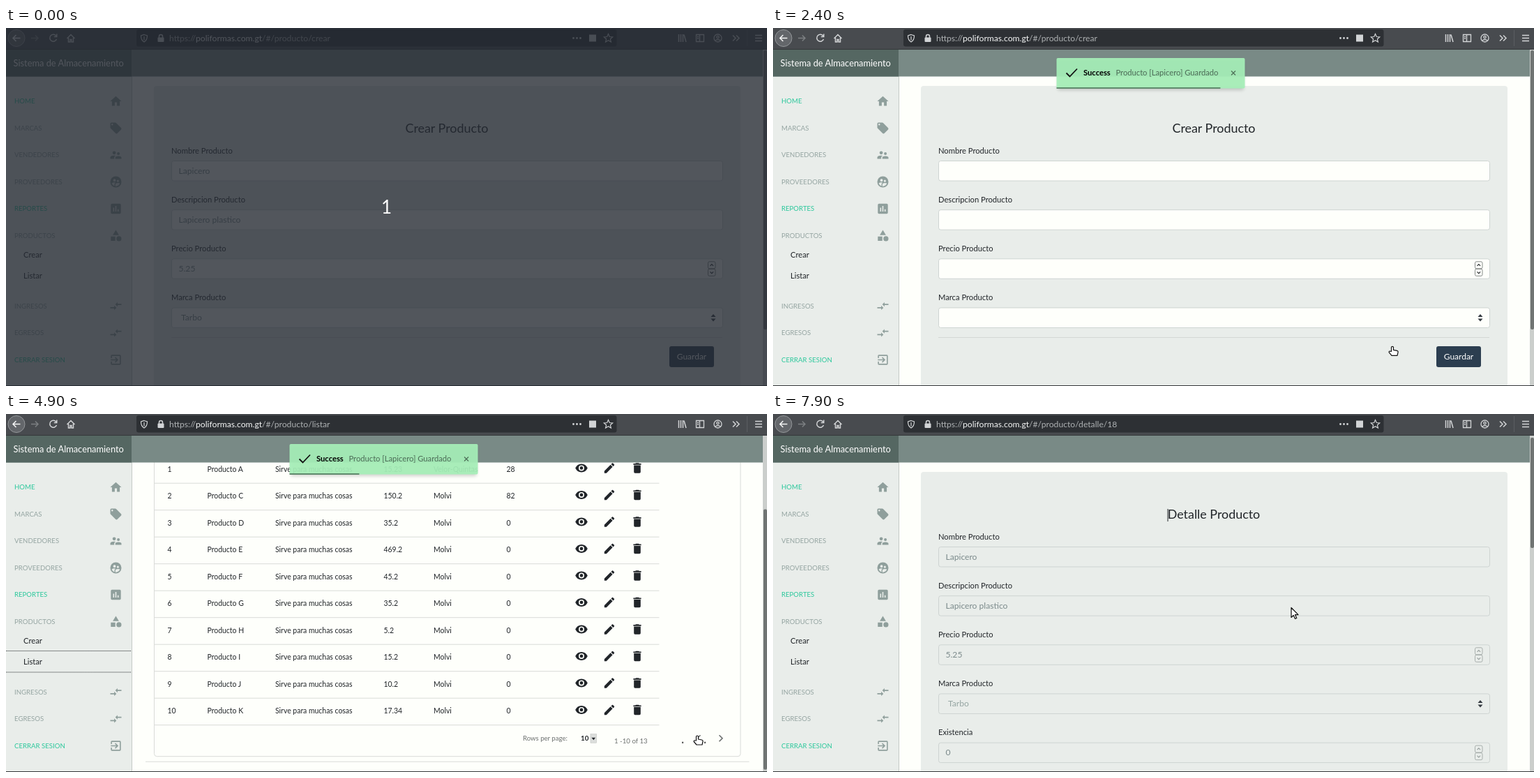
Animation of 1091x513 px, one loop 8000 ms. Source, as an HTML page:

```html
<!DOCTYPE html>
<html lang="es">
<head>
<meta charset="utf-8">
<title>Sistema de Almacenamiento</title>
<style>
html, body { margin: 0; width: 100%; height: 100%; overflow: hidden; background: #fefffb; }
svg { display: block; width: 1091px; height: 513px; font-family: Lato, sans-serif; }
</style>
</head>
<body>
<svg id="stage" viewBox="0 0 1091 513"></svg>
<script>
const stage = document.getElementById('stage');
const LOOP = 8000, STEP = 100, ROW = 38.5, TOP = 179.2;
const PAGE = '#fefffb', PANEL = '#e9edea', INK = '#212529', MUTED = '#95a5a2', GREEN = '#2cc89c',
  FIELD = '#7b8a8b', EDGE = '#ced4d2', RULE = '#d9dbd8', CHROME = '#d2d4d6';

// Drawing helpers; text takes the middle of its capitals as y
const text = (s, x, y, size, fill = INK, more = '') =>
  `<text x="${x}" y="${y + size * .36}" font-size="${size}" fill="${fill}" ${more}>${s}</text>`;
const rect = (x, y, w, h, fill, more = '') =>
  `<rect x="${x}" y="${y}" width="${w}" height="${h}" fill="${fill}" ${more}/>`;
const line = (d, color, w = 1, more = '') =>
  `<path d="${d}" fill="none" stroke="${color}" stroke-width="${w}" ${more}/>`;
const ring = (x, y, r) => `M${x - r} ${y}a${r} ${r} 0 1 0 ${2 * r} 0a${r} ${r} 0 1 0 ${-2 * r} 0z`;
const group = (x, y, s, more = '') => `<g transform="translate(${x} ${y})" ${more}>${s}</g>`;
const clamp = v => Math.max(0, Math.min(1, v));

// 24-unit icons
const icons = {
  home: 'M10 20v-6h4v6h5v-8h3L12 3 2 12h3v8z',
  tag: 'M4 2h7q.9 0 1.5.6l9 9q1 1.4 0 2.8l-7 7q-1.4 1-2.8 0l-9-9Q2 11.800 2 11V4q0-2 2-2z' + ring(5.5, 5.5, 1.5),
  people: ring(9, 8, 3) + ring(16.5, 9.5, 2.5) +
    'M9 13q-7 .3-7 3.500V19h7v-2.250q0-2 2.400-3.500zM16.500 14q-5.500.4-5.500 2.750V19h11v-2.250q0-2.300-5.500-2.750z',
  circle: ring(12, 12, 10) + ring(9.6, 9.1, 2.4) + ring(15.6, 10.3, 1.9) +
    'M9.600 15.900v3.700q-3.800-1.300-5.100-5 2.500-2 7-1.400-1.900.9-1.900 2.700zM11.200 20v-4.100q.6-2 4.400-2.100 2.500.1 3.800 1.100-2.500 5.100-8.200 5.100z',
  chart: 'M5 3h14q2 0 2 2v14q0 2-2 2H5q-2 0-2-2V5q0-2 2-2zM7 10v7h2v-7zM11 7v10h2V7zM15 13v4h2v-4z',
  shapes: 'M12 2L6.500 11h11zM3 13.500h8v8H3z' + ring(17.5, 17.5, 4.5),
  swap: 'M9 14H2v2h7v3l4-4-4-4zM15 13v-3h7V8h-7V5l-4 4z',
  exit: 'M10.100 15.600L11.500 17l5-5-5-5-1.400 1.400L12.700 11H3v2h9.700zM19 3H5Q3 3 3 5v4h2V5h14v14H5v-4H3v4q0 2 2 2h14q2 0 2-2V5q0-2-2-2z',
  print: 'M19 8H5q-3 0-3 3v6h4v4h12v-4h4v-6q0-3-3-3zM8 14h8v5H8zM18 3H6v4h12z' + ring(19, 11, 1),
  doc: 'M14 2H6Q4 2 4 4v16q0 2 2 2h12q2 0 2-2V8zM8 16h8v2H8zM8 12h8v2H8zM13 3.500L18.500 9H13z',
  search: ring(9.5, 9.5, 6.5) + ring(9.5, 9.5, 4.5) + 'M14 15.500L15.500 14l5 5-1.500 1.500z',
  eye: 'M12 4.500Q4.300 4.800 1 12q3.300 7.200 11 7.500 7.700-.3 11-7.500-3.300-7.200-11-7.500z' + ring(12, 12, 5) + ring(12, 12, 3),
  pen: 'M3 17.250V21h3.750L17.800 9.900l-3.700-3.700zM20.700 7q.6-.7 0-1.400l-2.300-2.300q-.7-.6-1.400 0l-1.900 1.800 3.800 3.800z',
  bin: 'M6 19q0 2 2 2h8q2 0 2-2V7H6zM19 4h-3.500l-1-1h-5l-1 1H5v2h14z'
};
const icon = (name, x, y, fill = INK, size = 19.2) =>
  `<path transform="translate(${x - size / 2} ${y - size / 2}) scale(${size / 24})" d="${icons[name]}" fill="${fill}" fill-rule="evenodd"/>`;

const menu = [['HOME', 105, 'home', 1], ['MARCAS', 143.5, 'tag'], ['VENDEDORES', 182, 'people'],
  ['PROVEEDORES', 220.5, 'circle'], ['REPORTES', 259, 'chart', 1], ['PRODUCTOS', 297.5, 'shapes'],
  ['INGRESOS', 398.5, 'swap'], ['EGRESOS', 437, 'swap'], ['CERRAR SESION', 475.5, 'exit', 1]];
const heads = ['Id', 'Nombre', 'Descripcion', 'Precio', 'Marca', 'Existencia', 'Actions'];
const product = (id, letter, price, brand = 'Molvi', stock = 0) =>
  [id, 'Producto ' + letter, 'Sirve para muchas cosas', price, brand, stock];
const first = [product(1, 'A', 15.23, 'Velor-Quintas', 28), product(2, 'C', 150.2, 'Molvi', 82),
  ...[35.2, 469.2, 45.2, 35.2, 5.2, 15.2, 10.2, 17.34].map((p, i) => product(i + 3, 'DEFGHIJK'[i], p))];
const second = [product(11, 'L', 16.2), product(12, 'M', 25.2),
  [18, 'Lapicero', 'Lapicero plastico', 5.25, 'Tarbo', 0]];
const columns = {
  loading: [231.5, 284, 363.5, 458.5, 530, 601, 688],
  first: [231.5, 288.5, 386, 541.5, 613, 717.5, 805],
  second: [233, 290, 389, 544.5, 616, 687.5, 774.5]
};

// Interpolate [time, ...values] keys
function at(keys, t) {
  const n = keys.findIndex(k => k[0] > t);
  if (n < 0) return keys.at(-1).slice(1);
  if (!n) return keys[0].slice(1);
  const a = keys[n - 1], b = keys[n], u = (t - a[0]) / (b[0] - a[0]);
  return a.slice(1).map((v, i) => v + (b[i + 1] - v) * u);
}
const pointer = [[300, 423, 229], [400, 530, 290], [500, 720, 385], [600, 841, 434], [700, 841, 434],
  [800, 930, 439], [900, 984, 443], [1000, 984, 443], [1300, 982, 472], [2300, 982, 472],
  [2600, 700, 425], [3000, 110, 346], [3200, 73, 344.5], [3400, 73, 344.5], [3900, 650, 405],
  [4100, 686, 417], [4300, 700, 425], [4800, 991, 461], [4900, 991, 461], [5100, 1023, 461],
  [6000, 1023, 461], [6400, 694, 351], [6500, 694, 351], [6700, 793, 271], [7100, 793, 271],
  [7500, 743, 277.5]];
const scrolling = [[3800, 0], [4100, 70], [4200, 70], [4500, 118.5]];

function form(title, values, locked, hovered) {
  const names = ['Nombre Producto', 'Descripcion Producto', 'Precio Producto', 'Marca Producto'];
  if (locked) names.push('Existencia');
  let s = rect(212, 83, 841, 440, PANEL, 'rx="4"') +
    text(title, 632, 144, 17.9, INK, 'text-anchor="middle"');
  if (locked) s += line('M566 136v18', INK);
  names.forEach((name, i) => {
    const y = 190.5 + i * 70.15, mid = y + 14, tone = locked ? '#98a09e' : '#6a6f6e';
    s += text(name, 237, y - 15, 11.2) +
      rect(237.5, y, 790, 28.5, locked ? PANEL : PAGE, `stroke="${EDGE}" rx="3"`) +
      text(values[i] ?? '', i == 3 ? 251 : 247.5, mid, 12.1, locked && i == 3 ? MUTED : FIELD);
    if (i == 3) s += `<path d="M1010.500 ${mid - 1}l3.500-4 3.500 4zm0 2.500l3.500 4 3.500-4z" fill="#343a40"/>`;
    if (i == 2 || i == 4)
      s += [0, 1].map(k => rect(1006.5, mid - 10 + k * 10.5, 10.5, 10, 'none', `stroke="${tone}" stroke-width=".8" rx="2"`) +
        line(`M1009.500 ${mid - 4 + k * 8.500}l2.300 ${k ? 2.3 : -2.3}l2.300 ${k ? -2.3 : 2.3}`, locked ? tone : INK, 1.1)).join('');
  });
  if (!locked)
    s += line('M237 443.500H1027', '#d3d7d4') + rect(951, 456, 64, 30, hovered ? '#1a252f' : '#2c3e50', 'rx="3"') +
      text('Guardar', 983, 470.5, 12, '#fff', 'text-anchor="middle"');
  return s;
}

function listing(kind, mx, my) {
  const wide = kind == 'second', cols = columns[kind], rows = wide ? second : first;
  const left = wide ? 213.5 : 212, right = wide ? 1062.5 : 1053, dx = right - 1053;
  const n = kind == 'loading' ? 10 : rows.length, end = kind == 'loading' ? 643 : cols[6] + 131.5;
  const last = TOP + n * ROW, over = Math.floor((my + 3 - TOP) / ROW);
  let s = rect(left + .5, 83.5, right - left - .5, last + 45 - 83.5, PAGE, `stroke="${RULE}" rx="4"`) +
    line(`M${left} 134.500H${right}`, RULE) + text('Listado de Productos', cols[0], 108, 16.1) +
    line(`M${cols[0] + 1} 100v17`, INK) +
    icon('print', 961 + dx, 105.5, '#5f6362') + icon('doc', 993 + dx, 105.5, '#5f6362') +
    icon('search', 1025 + dx, 105.5, '#5f6362') +
    heads.map((h, i) => text(h, cols[i], 157, 9.6, '#676b6a')).join('');
  for (let i = 0; i < n; i++) {
    const y = TOP + (i + .5) * ROW;
    if (kind == 'loading') s += rect(232, y - 6, 400, 12, '#dcddda', 'rx="3"');
    else {
      if (i == over && mx > left && mx < end) s += rect(left + 1, y - ROW / 2, end - left - 1, ROW, '#ececea');
      s += rows[i].map((v, k) => text(v, cols[k], y - .8, 10.45)).join('') +
        ['eye', 'pen', 'bin'].map((name, k) => icon(name, cols[6] + 20 + 40 * k, y - 2.5)).join('');
    }
    s += line(`M${left} ${y + ROW / 2}H${end}`, RULE);
  }
  const tx = dx * .4, mid = last + 19;
  s += text('Rows per page:', 741 + tx, mid, 9.6, '#6c706f') + text(10, 824 + tx, mid, 9.8, INK, 'font-weight="700"') +
    rect(838 + tx, mid - 6, 8.5, 12.5, '#dcdedc', 'stroke="#b5b8b6" stroke-width=".5"') +
    `<path d="M${839.5 + tx} ${mid - 1}h5.600l-2.800 3.500z" fill="${INK}"/>` +
    text(wide ? '10 -13 of 13' : '1 -10 of 13', 872 + tx, mid + 3.5, 9.7, '#6c706f') +
    [970, 1002].map(x => rect(x - 1 + dx, mid + 5, 2.2, 2.2, '#555')).join('') +
    line(`M${995.5 + dx} ${mid - 4.500}l-4.500 4.500 4.500 4.500M${1022.5 + dx} ${mid - 4.500}l4.500 4.500-4.500 4.500`, '#6a6e6d', 1.6) +
    line(`M${left - 12} ${last + 52.500}H${right + 12.5}`, RULE);
  if (wide) s += rect(1018.5, last + 8.5, 32.5, 24, 'none', 'stroke="#555" stroke-width=".8" stroke-dasharray="1 .6"');
  return s;
}

function sidebar(w, focused) {
  const shift = w - 180;
  return rect(0, 69, w, 444, PANEL) + line(`M${w + .5} 69V512`, '#c5cac7') +
    menu.map(([name, y, pic, on]) => text(name, 12, y, 9.65, on ? GREEN : MUTED) +
      icon(pic, 157.5 + shift, y, '#8f9f9c')).join('') +
    text('Crear', 25, 325, 11.2) + text('Listar', 25, 354.5, 11.2) +
    (focused ? line(`M0 339.500H${w}M0 370H${w}`, INK, 1, 'stroke-dasharray="1 1"') : '');
}

function browser(path) {
  const tool = (d, color = CHROME, w = 1.5) => line(d, color, w);
  return rect(0, 0, 1091, 31, '#484b4f') + rect(0, 30, 1091, 1, '#34373a') +
    rect(187, 2, 688.5, 24.5, '#2d3034', 'rx="3"') +
    `<path d="${ring(15, 14.5, 12)}" fill="#63666a" stroke="#94979a"/>` +
    tool('M20.500 14.500H10M14.500 10l-4.500 4.500 4.500 4.500', '#f3f4f4') +
    tool('M36 14.500h10M42 10.500l4 4-4 4', '#7c7f82') +
    tool('M72 11.500a5 5 0 1 0 .5 4.500M72.800 8.500v4h-4') +
    tool('M87.500 15l5.500-5.500 5.500 5.500M89.500 14v6h2.500v-3.500h2v3.500h2.500v-6') +
    tool('M198 9.500l4.500 1.500q0 6.500-4.500 9-4.500-2.500-4.500-9zM198 12v5.500', CHROME, 1.2) +
    rect(217.5, 13.5, 9, 6.5, CHROME, 'rx="1"') + tool('M219.500 14v-2q0-2.500 2.500-2.500t2.500 2.500v2') +
    text(`https://<tspan fill="#f6f7f7">poliformas.com.gt</tspan>/#/producto/${path}`, 234, 14.5, 12.15, '#aeb1b3') +
    [813.5, 818.5, 823.5].map(x => `<circle cx="${x}" cy="14.500" r="1.400" fill="${CHROME}"/>`).join('') +
    rect(836, 9.5, 10, 10, CHROME) +
    tool('M863.500 8.500l1.800 4 4.400.4-3.300 2.900 1 4.300-3.900-2.300-3.900 2.300 1-4.300-3.300-2.900 4.400-.4z', CHROME, 1.2) +
    tool('M964.500 9v11M967.500 9v11M970.500 9v11M972 9.500l3 10.500') +
    tool('M989.500 9.500h11v10h-11zM994.500 9.500v10M991 12.500h2M991 15h2', CHROME, 1.3) +
    tool(ring(1020.5, 14.5, 5.5) + ring(1020.5, 13, 1.7) + 'M1017 18q3.500-3 7 0', CHROME, 1.3) +
    tool('M1042 10.500l4 4-4 4M1047 10.500l4 4-4 4') + tool('M1062.500 3v23', '#5b5e62', 1) +
    tool('M1074 10.500h10M1074 14.500h10M1074 18.500h10');
}

function toast(t, x) {
  const show = clamp((t - 1600) / 300), hide = clamp((t - 6850) / 300);
  if (!show || hide == 1) return '';
  const w = 270 * clamp((6750 - t) / 5000);
  return group(x, 43 - 12 * (1 - show) - 12 * hide,
    rect(2, 3, 266, 43, '#000', 'opacity=".18" filter="url(#soft)"') +
    rect(0, 0, 270, 43.5, '#a6efb8', 'opacity=".93" rx="2"') + rect(0, 42, w, 2, '#5f8a6c') +
    line('M14 21.500l5 5L29.500 15.500', '#111', 1.8) +
    text('Success', 38.5, 20.5, 11.2, '#000', 'font-weight="700"') +
    text('Producto [Lapicero] Guardado', 85, 20.5, 11.2, '#4c6b56') +
    line('M250.500 18.500l6 6M256.500 18.500l-6 6', '#4a6a54', 1.1), `opacity="${show * (1 - hide)}"`);
}

function cursor(t, x, y) {
  const hand = t >= 1100 && t < 2500 || t >= 3100 && t < 5300 || t >= 6600 && t < 7100;
  const d = hand
    ? 'M-1.500 7V1.500Q-1.500 0 0 0T1.500 1.500V5L6.500 6Q8.500 6.500 8 8.500L7 13H-1L-4.800 8.500Q-5 6.500-3.500 6.800z'
    : 'M0 0V14L3.200 11 5.600 16 7.800 15 5.500 10.200H10z';
  return group(x, y, `<path d="${d}" fill="#fff" stroke="#111" stroke-width="1.200" stroke-linejoin="round"/>`);
}

function scene(t) {
  const [mx, my] = at(pointer, t), [scroll] = at(scrolling, t);
  const wide = t >= 5300 && t < 7000, side = wide ? 181.5 : 180;
  const path = t < 3300 ? 'crear' : t < 7000 ? 'listar' : 'detalle/18';
  let body, thumb = [34, 373];
  if (t < 3300) {
    body = form('Crear Producto', t < 1600 ? ['Lapicero', 'Lapicero plastico', '5.25', 'Tarbo'] : [], false, t >= 1100 && t < 2400);
    thumb = [32, 400];
  } else if (t < 7000) {
    const y = wide ? 0 : scroll;
    body = group(0, -y, listing(t < 3500 ? 'loading' : wide ? 'second' : 'first', mx, my + y));
    thumb[0] += y * .865;
  } else {
    const ready = t >= 7800;
    body = form('Detalle Producto', ready ? ['Lapicero', 'Lapicero plastico', '5.25', 'Tarbo', '0'] : [], true);
    thumb[1] = ready ? 158 : 340;
  }
  const link = t >= 3100 && t < 3500 ? 'listar' : t >= 6700 && t < 7000 ? 'detalle/18' : '';
  let s = '<defs><filter id="soft"><feGaussianBlur stdDeviation="2.500"/></filter></defs>' +
    rect(0, 0, 1091, 513, PAGE) + body + sidebar(side, t >= 3300 && !wide && t < 7000) +
    rect(0, 31, 1091, 38.5, '#798a86') + rect(0, 31, side, 38.5, '#556762') +
    text('Sistema de Almacenamiento', 10.5, 50, 12.85, '#fff');
  if (!wide) s += rect(1085, 31, 6, 481, '#cbcecc') + rect(1086, thumb[0], 5, thumb[1], '#707473', 'rx="2"');
  s += toast(t, wide ? 411 : 406.5) + browser(path);
  if (link)
    s += `<path d="M0 492.500H${link == 'listar' ? 227 : 253}q3 0 3 3V512H0z" fill="#9da09e"/>` +
      text('https://poliformas.com.gt/#/producto/' + link, 2, 502.5, 11.55, '#f7f8f6');
  s += rect(0, 512, 1091, 1, '#34373a');
  if (t < 100)
    return s + rect(0, 0, 1091, 513, '#242932', 'opacity=".79"') + text(1, 545.5, 256.5, 26, '#fff', 'text-anchor="middle"');
  return s + cursor(t, mx, my);
}

let shown = -1;
function tick(now) {
  const t = Math.floor(now % LOOP / STEP) * STEP;
  if (t != shown) stage.innerHTML = scene(shown = t);
  requestAnimationFrame(tick);
}
tick(performance.now());
</script>
</body>
</html>
```
